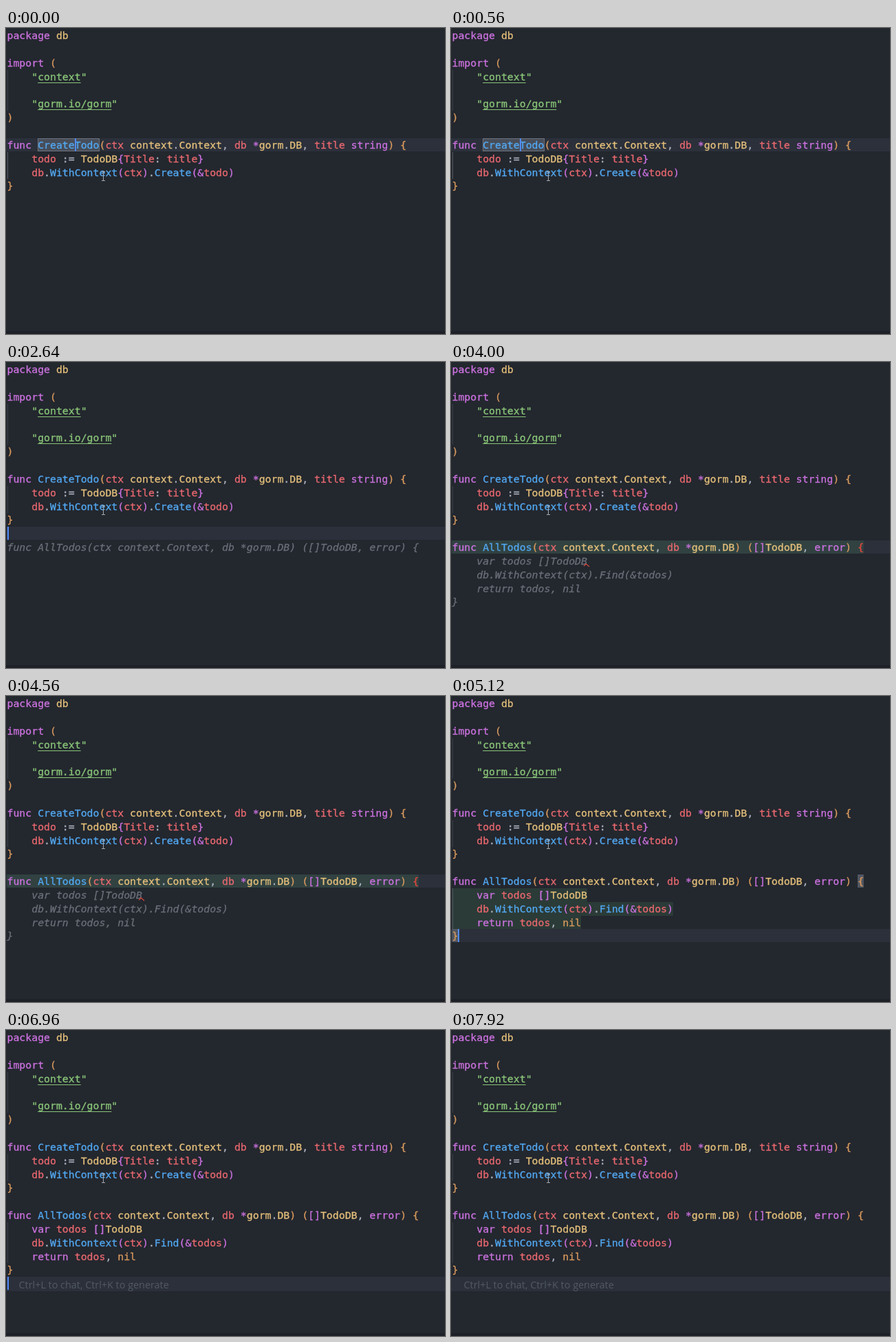
These frames come from a looping animation (638x444 px, 8000 ms). An HTML page with a canvas:

```html
<!DOCTYPE html>
<html>
<head>
<meta charset="utf-8">
<style>
html, body { margin: 0; width: 100%; height: 100%; overflow: hidden; background: #23272e; }
canvas { display: block; }
</style>
</head>
<body>
<canvas id="stage" width="638" height="444"></canvas>
<script>
const ctx = document.getElementById('stage').getContext('2d');
const LOOP = 8000, LEFT = 1.5, COL = 8.93, ROW = 19.85;
const MONO = '14.83px "DejaVu Sans Mono", "Noto Sans Mono", monospace';

const C = {
  bg: '#23272e', line: '#2b303b', plain: '#abb2bf', ghost: '#6a6f78',
  purple: '#cc72e0', red: '#e9686f', yellow: '#e5c07b', green: '#89c578',
  blue: '#52a8f2', orange: '#d99a5e', caret: '#528bff', bracket: '#515762',
  added: 'rgba(70, 120, 85, .24)', guide: '#3a3f49', activeGuide: '#565c68', error: '#e0483e'
};

const code = `package db

import (
    "context"

    "gorm.io/gorm"
)

func CreateTodo(ctx context.Context, db *gorm.DB, title string) {
    todo := TodoDB{Title: title}
    db.WithContext(ctx).Create(&todo)
}

func AllTodos(ctx context.Context, db *gorm.DB) ([]TodoDB, error) {
    var todos []TodoDB
    db.WithContext(ctx).Find(&todos)
    return todos, nil
}`.split('\n');

const words = {
  purple: 'package import func var return string error * &',
  blue: 'CreateTodo AllTodos WithContext Create Find',
  yellow: 'context Context gorm DB TodoDB',
  red: 'ctx db title todo todos Title',
  orange: 'nil'
};
const wordColor = {};
for (const name in words) for (const w of words[name].split(' ')) wordColor[w] = C[name];

// Bracket colours alternate with nesting depth.
let depth = 0;
function tokenColor(text, row) {
  if ('([{'.includes(text)) return [C.orange, C.purple][depth++ % 2];
  if (')]}'.includes(text)) return [C.orange, C.purple][--depth % 2];
  if (text[0] === '"') return C.green;
  return row === 0 && text === 'db' ? C.yellow : wordColor[text] || C.plain;
}
const tokens = code.map((text, row) =>
  [...text.matchAll(/"[^"]*"|\w+|:=|\S/g)].map(m =>
    ({ text: m[0], col: m.index, color: tokenColor(m[0], row) })));

// Each step: start time, code rows shown, caret row and column, caret hide time.
const steps = [
  { at: 0, rows: 12, caret: [8, 11], hide: LOOP, word: true, active: 9 },
  { at: 720, rows: 12, caret: [11, 1], hide: 960, pair: [[8, 64], [11, 0]], active: 9 },
  { at: 2000, rows: 12, caret: [12, 0], hide: LOOP },
  { at: 2240, rows: 12, caret: [12, 0], hide: LOOP, ghost: [13, 14] },
  { at: 3040, rows: 14, caret: [13, 67], hide: 3440, ghost: [14, 18], added: [13, 14], broken: true },
  { at: 4640, rows: 18, caret: [17, 1], hide: LOOP, added: [14, 18], pair: [[13, 66], [17, 0]], active: 14 },
  { at: 6880, rows: 18, caret: [18, 0], hide: 7520, hint: true }
];

const x = col => LEFT + col * COL;
const y = row => Math.round(1 + row * ROW);

function rect(color, left, top, width, height) {
  ctx.fillStyle = color;
  ctx.fillRect(left, top, width, height);
}

// Keeps every character on the column grid; the thin stroke gives a medium weight.
function write(text, col, row, color, font) {
  ctx.font = font;
  ctx.fillStyle = ctx.strokeStyle = color;
  ctx.lineWidth = .3;
  [...text].forEach((char, i) => {
    ctx.fillText(char, x(col + i), y(row) + 15);
    ctx.strokeText(char, x(col + i), y(row) + 15);
  });
}

function path(color, width, ...lines) {
  ctx.strokeStyle = color;
  ctx.lineWidth = width;
  ctx.beginPath();
  for (const points of lines) for (const [px, py] of points) {
    if (points[0][0] === px && points[0][1] === py) ctx.moveTo(px, py);
    else ctx.lineTo(px, py);
  }
  ctx.stroke();
}

function guide(from, to, active) {
  rect(from === active ? C.activeGuide : C.guide, 2, y(from), 1, y(to) - y(from));
}

function drawRow(row, broken) {
  for (const { text, col, color } of tokens[row]) {
    const bad = broken && row === 13 && col === 66;
    write(text, col, row, bad ? C.error : color, MONO);
    if (text[0] === '"') rect(C.green, x(col + 1), y(row) + 18, (text.length - 2) * COL, 1);
  }
}

function draw(t) {
  const s = steps.filter(step => step.at <= t).pop();
  const [row, col] = s.caret;
  rect(C.bg, 0, 0, 638, 444);
  rect('#1d2026', 0, 440, 638, 4);
  rect(C.line, 0, y(row), 638, s.hint ? 21 : 19);

  if (s.added) {
    for (let r = s.added[0]; r < s.added[1]; r++) {
      const height = r === row ? 19 : y(r + 1) - y(r);
      rect(C.added, LEFT, y(r), code[r].length * COL, height);
    }
  }
  guide(3, 6, s.active);
  guide(9, 11, s.active);
  if (s.rows > 14) guide(14, 17, s.active);

  if (s.word) {
    rect('#484e59', x(5), y(8), 10 * COL, 19);
    ctx.strokeStyle = '#6c727d';
    ctx.lineWidth = 1;
    ctx.strokeRect(46.5, y(8) + .5, 89, 18);
  }
  for (const [r, c] of s.pair || []) rect(C.bracket, x(c), y(r), COL, 19);

  for (let r = 0; r < s.rows; r++) drawRow(r, s.broken);
  if (s.ghost) {
    for (let r = s.ghost[0]; r < s.ghost[1]; r++) write(code[r], 0, r, C.ghost, 'italic ' + MONO);
  }
  if (s.broken) path(C.error, 1.1, [[193, 296], [196.5, 293], [201, 297]]);
  if (s.hint) {
    ctx.font = '14.4px "Open Sans", "Noto Sans", sans-serif';
    ctx.fillStyle = '#535963';
    ctx.fillText('Ctrl+L to chat, Ctrl+K to generate', 18.5, 375);
  }
  if (t < s.hide) rect(C.caret, Math.round(x(col)), y(row), 2, 19);

  // Mouse pointer
  path('#a4a8ae', 1,
    [[139, 208.5], [144, 208.5]], [[141.5, 209], [141.5, 221]], [[139, 221.5], [144, 221.5]]);
}

function tick() {
  draw(performance.now() % LOOP);
  requestAnimationFrame(tick);
}
tick();
</script>
</body>
</html>
```
